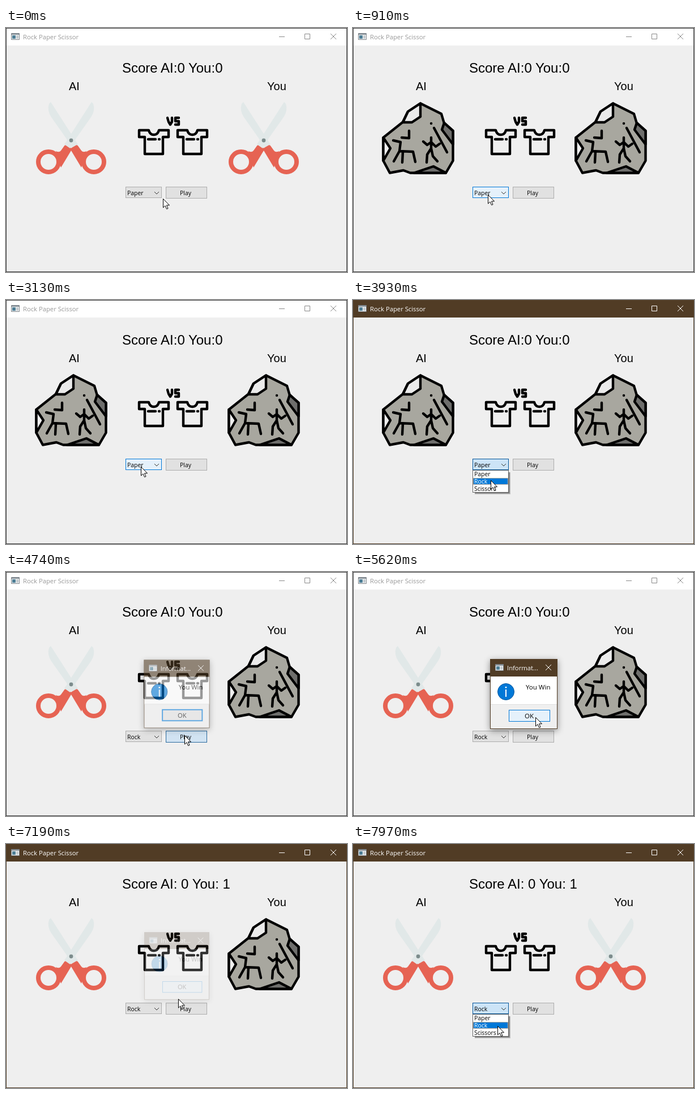
Write an HTML page that moves like this. It is 602x432 px and loops after 8 s.

```html
<!DOCTYPE html>
<html lang="en">
<head>
<meta charset="utf-8">
<title>Rock Paper Scissor</title>
<style>
html, body { margin: 0; width: 100%; height: 100%; overflow: hidden; background: #efefef; }
svg { display: block; }
text { font-family: "Open Sans", "Noto Sans", sans-serif; font-size: 10.4px; fill: #000; }
.caption { font-size: 11.25px; }
.dialog-text { font-size: 11.5px; }
.score { font: 24px "Liberation Sans", Arial, sans-serif; }
.player { font: 20px "Liberation Sans", Arial, sans-serif; }
.line { fill: none; stroke: #000; stroke-width: 4.4; stroke-linecap: round; stroke-linejoin: round; }
.thin { fill: none; stroke-width: 1; }
.white text, text.white { fill: #fff; }
.control { fill: #e1e1e1; stroke: #adadad; }

/* One loop is 8 s, so 1% is 80 ms. */
.anim { animation: 8s step-end infinite; }
.smooth { animation-timing-function: linear; }
.active { animation-name: active; }
.ai-hand { animation-name: ai-hand; }
.your-hand { animation-name: your-hand; }
.score-old { animation-name: score-old; }
.score-new { animation-name: score-new; }
.pick-old { animation-name: pick-old; }
.pick-new { animation-name: pick-new; }
.combo { animation-name: combo; }
.play { animation-name: play; }
.ok { animation-name: ok; }
.list { animation-name: list; }
.hi-paper { animation-name: hi-paper; }
.hi-rock { animation-name: hi-rock; }
.dialog { animation-name: dialog; transform-origin: 301.5px 216px; filter: drop-shadow(0 3px 6px rgba(0,0,0,.42)); }
.cursor { animation-name: cursor; }

@keyframes active {
  0%, 58.6% { visibility: hidden; }
  39.2%, 88.5%, 100% { visibility: visible; }
}
/* The hands sit on a strip: scissors at 0, rock at -200. */
@keyframes ai-hand {
  0%, 8%, 15.5%, 30.875%, 58.6%, 100% { transform: none; }
  .5%, 11.375%, 26.75%, 34.375% { transform: translateX(-200px); }
}
@keyframes your-hand {
  0%, 8%, 15.5%, 30.875%, 93.5%, 100% { transform: none; }
  .5%, 11.375%, 26.75%, 34.375% { transform: translateX(-200px); }
}
@keyframes score-old { 0% { visibility: visible; } 88.5%, 100% { visibility: hidden; } }
@keyframes score-new { 0% { visibility: hidden; } 88.5%, 100% { visibility: visible; } }
@keyframes pick-old { 0% { visibility: visible; } 50.375%, 100% { visibility: hidden; } }
@keyframes pick-new { 0% { visibility: hidden; } 50.375%, 100% { visibility: visible; } }
@keyframes combo {
  0%, 50.375% { fill: #e1e1e1; stroke: #adadad; }
  8%, 93.5% { fill: #e5f1fb; stroke: #0078d7; }
  39.2%, 96.125%, 100% { fill: #cce4f7; stroke: #005499; }
}
@keyframes play {
  0%, 55.6%, 61.25%, 90.6%, 92.8%, 100% { fill: #e1e1e1; stroke: #adadad; }
  56.2%, 57.6%, 91.3%, 92% { fill: #e5f1fb; stroke: #0078d7; }
  57.9%, 58.6% { fill: #cce4f7; stroke: #005499; }
}
@keyframes ok {
  0% { fill: #e1e1e1; stroke: #0078d7; stroke-width: 2; }
  68% { fill: #e5f1fb; stroke: #0078d7; stroke-width: 1; }
  87.25% { fill: #cce4f7; stroke: #005499; stroke-width: 1; }
  88.1%, 100% { fill: #e5f1fb; stroke: #0078d7; stroke-width: 1; }
}
@keyframes list {
  0%, 50.375% { visibility: hidden; }
  39.5%, 96.125%, 100% { visibility: visible; }
}
@keyframes hi-paper {
  0%, 47%, 98.9%, 100% { visibility: hidden; }
  39.5%, 98.1% { visibility: visible; }
}
@keyframes hi-rock {
  0%, 50.375%, 98.1% { visibility: hidden; }
  47%, 96.125%, 98.9%, 100% { visibility: visible; }
}
@keyframes dialog {
  0%, 58.5% { opacity: 0; transform: scale(.95); }
  59.25% { opacity: .6; transform: scale(.975); }
  60.3% { opacity: .92; transform: scale(.995); }
  61.375%, 88.1% { opacity: 1; transform: none; }
  89.875% { opacity: .2; transform: scale(.965); }
  90.5%, 100% { opacity: 0; transform: scale(.95); }
}
@keyframes cursor {
  0%, .25% { transform: translate(277px, 302px); }
  1.9% { transform: translate(270px, 318px); }
  3.625%, 5.3% { transform: translate(258px, 304px); }
  8.1% { transform: translate(245px, 299px); }
  11.375%, 42% { transform: translate(238px, 295px); }
  45% { transform: translate(240px, 308px); }
  49%, 50.6% { transform: translate(243px, 319px); }
  53% { transform: translate(266px, 312px); }
  57%, 64.375% { transform: translate(315px, 289px); }
  67% { transform: translate(319px, 270px); }
  70.25%, 87.9% { transform: translate(322px, 257px); }
  89.875% { transform: translate(304px, 274px); }
  91.5% { transform: translate(290px, 284px); }
  95%, 97.4% { transform: translate(252px, 287px); }
  99.6%, 100% { transform: translate(255px, 322px); }
}
</style>
</head>
<body>
<svg width="602" height="432" viewBox="0 0 602 432">
  <defs>
    <g id="half-scissors">
      <path fill="#e1e8e8" d="M79 131L127 206L117 213L106 195L80 158Q72 146 76 134Z"/>
      <g fill="#e66353">
        <path d="M88 218Q94 221 97 217L102 210Q104 206 107 208L114 212Q117 214 115 217L97 247Z"/>
        <circle cx="75" cy="237" r="18" fill="none" stroke="#e66353" stroke-width="8"/>
      </g>
    </g>
    <g id="scissors">
      <use href="#half-scissors"/>
      <use href="#half-scissors" transform="matrix(-1 0 0 1 230 0)"/>
      <circle cx="115" cy="199" r="3.4" fill="#7c8c8c"/>
    </g>
    <g id="rock" class="line" stroke-width="5">
      <path fill="#a8a79f" d="M119 133.500L156 152L161 169L176.500 182V235L164 256.500H101L89 252L65 256.500L53.500 235V194L88 166.500L97 148Z"/>
      <path fill="#ebebeb" d="M119 133.500V157L104 167H88L97 148Z"/>
      <path fill="#efefef" d="M53.500 194L66 213L53.500 235Z"/>
      <path fill="#6e6e6c" d="M161 168L157 180L176.500 206V182Z"/>
      <path fill="#6e6e6c" d="M108 256.500L142 245L164 256.500Z"/>
      <path d="M138 169h.1M143 177L166 220
        M138 194V213L131 224L130 238M138 213L141 227L149 236
        M124 201L131 207L138 202L146 210L153 205
        M71 199L84 202L82 218L106 219L110 237M82 218L72 236M88 219L87 238
        M86 194L99 195V182"/>
    </g>
    <g id="shirt" class="line">
      <path d="M235 181H252Q254 189 261 189Q268 189 270 181H287V193H277V223H245V193H235Z" style="fill:inherit"/>
      <path d="M251 197H264M270 197H271"/>
    </g>
    <g id="icon">
      <path fill="#f7f7f7" stroke="#7c8288" d="M9.500 9.500H23.500V20.500H9.500Z"/>
      <path fill="#8a949c" d="M10 10H23V12H10Z"/>
      <path fill="#4f7f96" d="M11 13H17V19H11Z"/>
      <path fill="#c5ccd0" d="M18 13H22V19H18Z"/>
    </g>
    <path id="cross" class="thin" d="M0 0L10 10M10 0L0 10"/>
    <g id="buttons" class="thin">
      <path d="M482 15.500H492M527.500 10.500H536.500V19.500H527.500Z"/>
      <use href="#cross" x="573" y="10"/>
    </g>
  </defs>

  <rect width="602" height="432" fill="#efefef"/>
  <rect width="602" height="31" fill="#fff"/>
  <use href="#icon"/>
  <text class="caption" x="30" y="20" style="fill:#999">Rock Paper Scissor</text>
  <use href="#buttons" stroke="#888"/>
  <rect x=".5" y=".5" width="601" height="431" class="thin" stroke="#3c3c3c"/>
  <g class="anim active white">
    <rect width="602" height="31" fill="#513c25"/>
    <use href="#icon"/>
    <text class="caption" x="30" y="20">Rock Paper Scissor</text>
    <use href="#buttons" stroke="#fff"/>
    <rect x=".5" y=".5" width="601" height="431" class="thin" stroke="#513c25"/>
  </g>

  <text class="score anim score-old" x="205" y="79">Score AI:0 You:0</text>
  <text class="score anim score-new" x="205" y="79">Score AI: 0 You: 1</text>
  <text class="player" x="111" y="110">AI</text>
  <text class="player" x="461" y="110">You</text>

  <svg x="49" y="129" width="132" height="132" viewBox="49 129 132 132">
    <g class="anim ai-hand"><use href="#scissors"/><use href="#rock" x="200"/></g>
  </svg>
  <svg x="389" y="129" width="132" height="132" viewBox="49 129 132 132">
    <g class="anim your-hand"><use href="#scissors"/><use href="#rock" x="200"/></g>
  </svg>

  <path class="line" d="M285 159L287 166L290 171L293 166L293 159M305 159H299V165H305V171H299"/>
  <use href="#shirt" fill="#ed1c24"/>
  <use href="#shirt" x="68" fill="#ffde17"/>

  <rect class="control anim combo" x="211.500" y="281.500" width="63" height="19"/>
  <path class="thin" stroke="#333" d="M262 290L266 294L270 290"/>
  <text class="anim pick-old" x="214" y="296">Paper</text>
  <text class="anim pick-new" x="214" y="296">Rock</text>
  <rect class="control anim smooth play" x="282.500" y="281.500" width="72" height="20"/>
  <text x="307" y="296">Play</text>

  <g class="anim list">
    <path fill="#000" opacity=".2" d="M215 305H278V344H215Z"/>
    <path fill="#000" opacity=".35" d="M215 305H276.500V342.500H215Z"/>
    <rect x="211.500" y="301.500" width="63" height="39" fill="#fff" stroke="#646464"/>
    <text x="214" y="312">Paper</text>
    <text x="214" y="325">Rock</text>
    <text x="214" y="338">Scissors</text>
  </g>
  <g class="anim hi-paper white">
    <rect x="212.500" y="302.500" width="61" height="12" fill="#0078d7" stroke="#e2914c" stroke-dasharray="1"/>
    <text x="214" y="312">Paper</text>
  </g>
  <g class="anim hi-rock white">
    <rect x="212.500" y="315.500" width="61" height="11" fill="#0078d7" stroke="#e2914c" stroke-dasharray="1"/>
    <text x="214" y="325">Rock</text>
  </g>

  <g class="anim smooth dialog">
    <rect x="242.500" y="154.500" width="118" height="123" fill="#efefef" stroke="#513c25"/>
    <path fill="#513c25" d="M242 154H361V185H242Z"/>
    <path fill="#fff" d="M243 185H360V234H243Z"/>
    <path class="thin" stroke="#dfdfdf" d="M243 234.500H360"/>
    <use href="#icon" x="242" y="154"/>
    <text class="caption white" x="272" y="174">Informat...</text>
    <use href="#cross" x="340" y="164" stroke="#fff"/>
    <circle cx="270" cy="212" r="14.500" fill="#0078d7" stroke="#00569c"/>
    <path fill="#fff" d="M269 208H271V221H269ZM268.700 203H271.300V205.600H268.700Z"/>
    <text class="dialog-text" x="305" y="208">You Win</text>
    <rect class="anim ok" x="275.500" y="244.500" width="72" height="20"/>
    <text class="dialog-text" x="303" y="259">OK</text>
  </g>

  <path class="anim smooth cursor" fill="#fff" stroke="#000" d="M.5 .5V16L4 12.700L6.600 18.500L9 17.500L6.500 11.800H11.500Z"/>
</svg>
</body>
</html>
```
